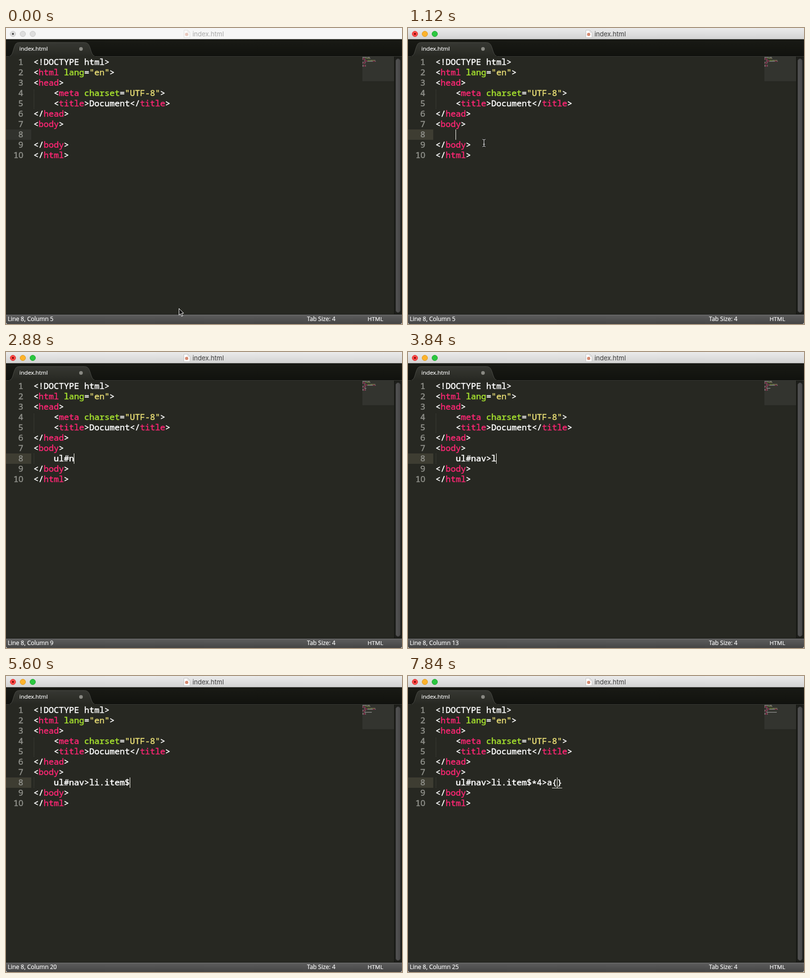
Write an HTML page that moves like this. It is 800 by 601 pixels and loops after 8000 ms.

```html
<!DOCTYPE html>
<html lang="en">
<head>
<meta charset="UTF-8">
<title>Code editor</title>
<style>
html, body { margin: 0; width: 100%; height: 100%; overflow: hidden; background: #272822; }
svg { display: block; width: 800px; height: 601px; }
.code text {
  font: 17.07px "Noto Sans Mono", "DejaVu Sans Mono", monospace;
  white-space: pre; fill: currentColor; stroke: currentColor; stroke-width: .5px;
}
.ui { font: 11.6px "Open Sans", "Noto Sans", sans-serif; fill: #fff; stroke: #fff; stroke-width: .2px; }
.status { font-size: 11.9px; }
.title { font: 13px Inter, "Liberation Sans", sans-serif; }
.zero { font-family: "Noto Sans", sans-serif; }
</style>
</head>
<body>
<svg viewBox="0 0 800 601">
  <defs>
    <linearGradient id="barOn" x2="0" y2="1"><stop stop-color="#ebebeb"/><stop offset="1" stop-color="#d2d2d2"/></linearGradient>
    <linearGradient id="strip" x2="0" y2="1"><stop stop-color="#191a15"/><stop offset="1" stop-color="#11120e"/></linearGradient>
    <linearGradient id="tab" x2="0" y2="1"><stop stop-color="#363732"/><stop offset="1" stop-color="#272822"/></linearGradient>
    <linearGradient id="status" x2="0" y2="1"><stop stop-color="#606060"/><stop offset="1" stop-color="#444"/></linearGradient>
    <linearGradient id="thumb"><stop stop-color="#555"/><stop offset="1" stop-color="#454545"/></linearGradient>
  </defs>
  <rect width="800" height="601" fill="#272822"/>

  <rect id="bar" width="800" height="23"/>
  <rect y="22" width="800" height="1" fill="#a5a5a5"/>
  <g id="lights"></g>
  <g id="heading">
    <path d="M359.5 4.5h8l4 4v11h-12z" fill="#fff" stroke="#c4c4c4"/>
    <path d="M367.5 4.5v4h4" fill="none" stroke="#c4c4c4"/>
    <circle cx="365" cy="13" r="3.3" fill="#d58a72"/>
    <text class="title" x="376.7" y="17" fill="#3c3c3c">index.html</text>
  </g>

  <rect y="23" width="800" height="34" fill="url(#strip)"/>
  <path d="M0 56.5H800" stroke="#0b0c09"/>
  <path d="M0 57.5H800" stroke="#373833"/>
  <path d="M4 58C13 57 13 50 16 41C19 32 20 29.5 28 29.5H157C165 29.5 167 32 170 41C173 50 174 57 182 58" fill="url(#tab)" stroke="#4b4c46"/>
  <path d="M5 58H181" stroke="#272822" stroke-width="2"/>
  <text class="ui" x="27" y="46">index.html</text>
  <circle cx="151.5" cy="42.5" r="3.7" fill="#898983"/>

  <rect id="gutter" y="206" width="51" height="21"/>
  <path d="M56.5 125V164" stroke="#484941" stroke-dasharray="1 1"/>
  <path id="guide" d="M56.5 206V227" stroke="#484941" stroke-dasharray="1 1"/>
  <g class="code" id="code"></g>
  <g class="code" id="typed"></g>
  <path id="braces" d="M291 227.5H311.5" stroke="#e8e8e2"/>
  <rect id="caret" y="206" width="1" height="21" fill="#f8f8f0"/>

  <rect x="720" y="58" width="64" height="50" fill="#33342f"/>
  <g id="map" opacity=".48"></g>
  <g id="typedMap" opacity=".48"></g>

  <rect x="784" y="58" width="16" height="523" fill="#1d1e1a"/>
  <path d="M784.5 58V581" stroke="#141511"/>
  <rect x="787.5" y="62.5" width="9" height="515" rx="4.5" fill="url(#thumb)" stroke="#393939"/>

  <rect y="581" width="800" height="20" fill="url(#status)"/>
  <path d="M0 581.5H800" stroke="#191a17"/>
  <path d="M0 582.5H800" stroke="#747474"/>
  <path d="M0 597V601H3Q0 600 0 597M800 597V601H797Q800 600 800 597" fill="#ddd"/>
  <text class="ui status" id="position" x="3.6" y="595"></text>
  <text class="ui status" x="608" y="595">Tab Size: 4</text>
  <text class="ui" x="730.5" y="595">HTML</text>

  <path id="arrow" d="M.5 .5V14L3.6 11.1L5.8 16.3L8.1 15.3L5.9 10.2H10z" fill="#111" stroke="#fff"/>
  <g id="beam" fill="none">
    <path d="M-3 -7.5Q0 -7.5 0 -5V5Q0 7.5 -3 7.5M3 -7.5Q0 -7.5 0 -5M0 5Q0 7.5 3 7.5M-2 2.5H2" stroke="#111" stroke-width="2.4"/>
    <path d="M-3 -7.5Q0 -7.5 0 -5V5Q0 7.5 -3 7.5M3 -7.5Q0 -7.5 0 -5M0 5Q0 7.5 3 7.5M-2 2.5H2" stroke="#fff"/>
  </g>
</svg>
<script>
const LOOP = 8000, STEP = 160, FOCUS = 1120;
const LEFT = 55.6, ADVANCE = 10.24, BASELINE = 74.5, LEADING = 21;
const WHITE = '#fff';
const lines = [
  '<!DOCTYPE html>', '<html lang="en">', '<head>',
  '    <meta charset="UTF-8">', '    <title>Document</title>',
  '</head>', '<body>', '', '</body>', '</html>'
];
const abbreviation = 'ul#nav>li.item$*4>a{';
const keyTimes = [
  2240, 2560, 2720, 2880, 3040, 3200, 3520, 3840, 4000, 4320,
  4800, 4960, 5120, 5440, 5600, 6080, 6400, 6880, 7200, 7840
];
// Caret opacity while the typist pauses: [from, to, opacity]
const fades = [
  [1280, 1440, .6], [1440, 1600, .25], [1600, 1920, 0], [1920, 2080, .4], [2080, 2240, .8],
  [5920, 6080, .4], [6720, 6880, .4], [7520, 7840, .4]
];

const $ = id => document.getElementById(id);
const set = (el, attrs) => {
  for (const key in attrs) el.setAttribute(key, attrs[key]);
  return el;
};
const add = (parent, tag, attrs, text = '') => {
  const el = set(document.createElementNS('http://www.w3.org/2000/svg', tag), attrs);
  el.textContent = text;
  return parent.appendChild(el);
};
const show = (id, on) => set($(id), { visibility: on ? 'visible' : 'hidden' });
const baseline = row => BASELINE + row * LEADING;

function tokens(line) {
  const pattern = /("[^"]*")|((?<=<\/?)\w+)|(\w+(?==))|([^\s"\w]+|\w+)/g;
  return [...line.matchAll(pattern)].map(m => ({
    col: m.index,
    text: m[0],
    color: m[1] ? '#e6db74' : m[2] ? '#f92672' : m[3] ? '#a6e22e' : WHITE
  }));
}

function drawLine(line, row, code, map) {
  for (const { col, text, color } of tokens(line)) {
    add(code, 'text', { x: LEFT + col * ADVANCE, y: baseline(row), color }, text);
    add(map, 'rect', { x: 720 + col, y: 59 + row * 2, width: text.length, height: 1.2, fill: color });
  }
}

lines.forEach((line, row) => {
  drawLine(line, row, $('code'), $('map'));
  const label = add($('code'), 'text', { x: 35, y: baseline(row), color: '#8f908a', 'text-anchor': 'end' });
  for (const digit of String(row + 1)) add(label, 'tspan', digit === '0' ? { class: 'zero' } : {}, digit);
});

const lights = [['#fc4a47', '#dd3633'], ['#fdb32c', '#dd9a22'], ['#2bc840', '#1fa52f']].map((colors, i) => ({
  colors,
  el: add($('lights'), 'circle', { cx: 14 + i * 20, cy: 12, r: 5.5 })
}));
add($('lights'), 'circle', { id: 'unsaved', cx: 14, cy: 12, r: 2 });

function setFocus(on) {
  set($('bar'), { fill: on ? 'url(#barOn)' : '#f6f6f6' });
  set($('heading'), { opacity: on ? 1 : .42 });
  set($('gutter'), { fill: on ? '#3e3d32' : '#31322d' });
  set($('unsaved'), { fill: on ? '#7a0604' : '#454545' });
  for (const { el, colors } of lights) {
    set(el, { fill: on ? colors[0] : '#dedede', stroke: on ? colors[1] : '#c8c8c8' });
  }
}

function setPointer(t) {
  const p = Math.min(t / 960, 1), eased = p * p * (3 - 2 * p);
  set($('arrow'), { transform: `translate(${349 - 223 * eased} ${569 - 352 * eased})` });
  set($('beam'), { transform: 'translate(153.5 233.5)' });
  show('arrow', t < FOCUS);
  show('beam', t >= FOCUS && t < keyTimes[0]);
}

function setTyping(t) {
  const count = keyTimes.filter(time => time <= t).length;
  const closed = count === abbreviation.length;
  const text = abbreviation.slice(0, count) + (closed ? '}' : '');
  $('typed').replaceChildren();
  $('typedMap').replaceChildren();
  if (count) {
    const line = add($('typed'), 'text', { x: LEFT + 4 * ADVANCE, y: baseline(7), color: WHITE });
    text.split(/(\*)/).forEach((part, i) => {
      // The asterisk sits at mid-height
      add(line, 'tspan', { dy: i === 1 ? 3 : i === 2 ? -3 : 0 }, part);
    });
    add($('typedMap'), 'rect', { x: 724, y: 73, width: text.length, height: 1.2, fill: WHITE });
  }
  const fade = fades.find(([from, to]) => t >= from && t < to);
  set($('caret'), {
    x: Math.floor(LEFT + (4 + count) * ADVANCE),
    opacity: t < FOCUS ? 0 : fade ? fade[2] : 1
  });
  show('guide', count > 0);
  show('braces', closed);
  $('position').textContent = `Line 8, Column ${5 + count}`;
}

function render(now) {
  const t = Math.floor(now % LOOP / STEP) * STEP;
  setFocus(t >= FOCUS);
  setPointer(t);
  setTyping(t);
}

const start = performance.now();
function tick() {
  render(performance.now() - start);
  requestAnimationFrame(tick);
}
tick();
</script>
</body>
</html>
```
